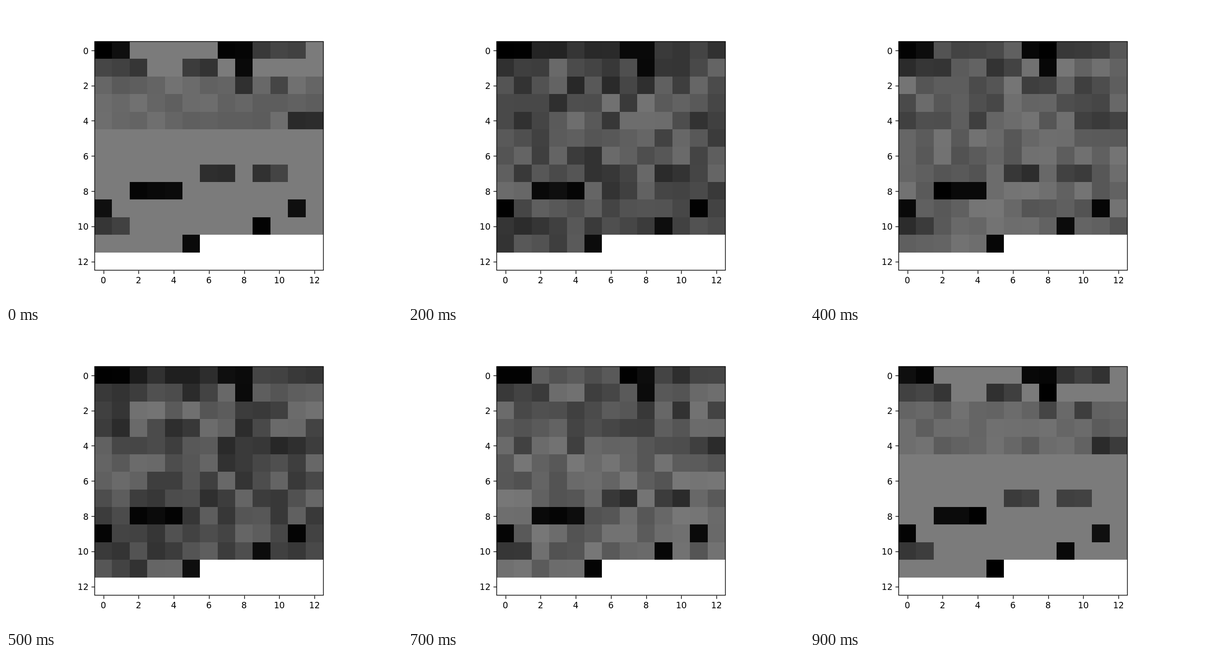
Animation of 864 by 648 pixels, one loop 1 s. Source, as an HTML page:

```html
<!DOCTYPE html>
<html lang="en">
<head>
<meta charset="utf-8">
<title>Heat map</title>
<style>
  html, body { margin: 0; height: 100%; overflow: hidden; background: #fff; }
  svg { display: block; width: 864px; height: 648px; }
  text { font: 18.75px "DejaVu Sans", sans-serif; }
  path { fill: none; stroke: #000; stroke-width: 1.5; }
</style>
</head>
<body>
<svg id="plot" viewBox="0 0 864 648">
  <g id="cells" shape-rendering="crispEdges"></g>
  <path d="M193.5 77.5H692.5V576.5H193.5Z"/>
</svg>
<script>
const SIZE = 13, COUNT = 149, STEP = 498.96 / SIZE, LEFT = 193.32, TOP = 77.76;
const PLAIN = 123, DIM = 56, DARK = 8;

// Runs that stay darker than their row: first cell, length
const darkRuns = [[0, 2], [7, 2], [21, 1], [106, 3], [117, 1], [128, 1], [139, 1], [148, 1]];
const dimRuns = [[9, 3], [13, 3], [18, 2], [34, 1], [36, 1], [63, 2], [97, 2], [100, 2], [130, 2]];

const plot = document.getElementById("plot");
const cellGroup = document.getElementById("cells");

function add(parent, tag, attrs, content = "") {
  const el = document.createElementNS("http://www.w3.org/2000/svg", tag);
  for (const key in attrs) el.setAttribute(key, attrs[key]);
  el.textContent = content;
  return parent.appendChild(el);
}

const edge = i => Math.round(i * STEP);
const mix = (a, b, t) => a + (b - a) * t;
const within = (runs, cell) => runs.some(([first, length]) => cell >= first && cell < first + length);

// Seeded random number from -1 to 1
function noise(cell, step) {
  const n = Math.sin(cell * 12.9898 + step * 78.233) * 43758.5453;
  return (n - Math.floor(n)) * 2 - 1;
}

const cells = Array.from({ length: COUNT }, (_, i) => {
  const col = i % SIZE, row = Math.floor(i / SIZE);
  return add(cellGroup, "rect", {
    x: 193 + edge(col), y: 77 + edge(row),
    width: edge(col + 1) - edge(col), height: edge(row + 1) - edge(row)
  });
});

for (let i = 0; i < SIZE; i += 2) {
  const x = LEFT + (i + 0.5) * STEP, y = TOP + (i + 0.5) * STEP;
  const tickX = Math.round(x) + 0.5, tickY = Math.round(y) + 0.5;
  add(plot, "path", { d: `M${tickX} 577.5v7M193.5 ${tickY}h-7` });
  add(plot, "text", { x, y: 605, "text-anchor": "middle" }, i);
  add(plot, "text", { x: 180.2, y: Math.round(y + 7.7), "text-anchor": "end" }, i);
}

function tone(cell, step) {
  if (within(darkRuns, cell)) return DARK * (1 + noise(cell, step));
  if (within(dimRuns, cell)) return DIM * (1 + 0.25 * noise(cell, step));

  // Rows 2 to 4 always vary; the others only as activity rises
  const row = Math.floor(cell / SIZE), activity = step % 3 / 2;
  const varied = row >= 2 && row <= 4;
  const calm = varied ? 102 : PLAIN;
  const busy = row ? 78 : 40;
  const spread = (varied ? 0.12 : 0) + 0.38 * activity;
  return mix(calm, busy, activity) * (1 + spread * noise(cell, step));
}

let shown = -1;
function draw(now) {
  const step = Math.floor(now % 1000 / 100);
  if (step !== shown) {
    shown = step;
    cells.forEach((cell, i) => {
      const v = Math.round(Math.min(PLAIN, tone(i, step)));
      cell.setAttribute("fill", `rgb(${v},${v},${v})`);
    });
  }
  requestAnimationFrame(draw);
}
draw(performance.now());
</script>
</body>
</html>
```
